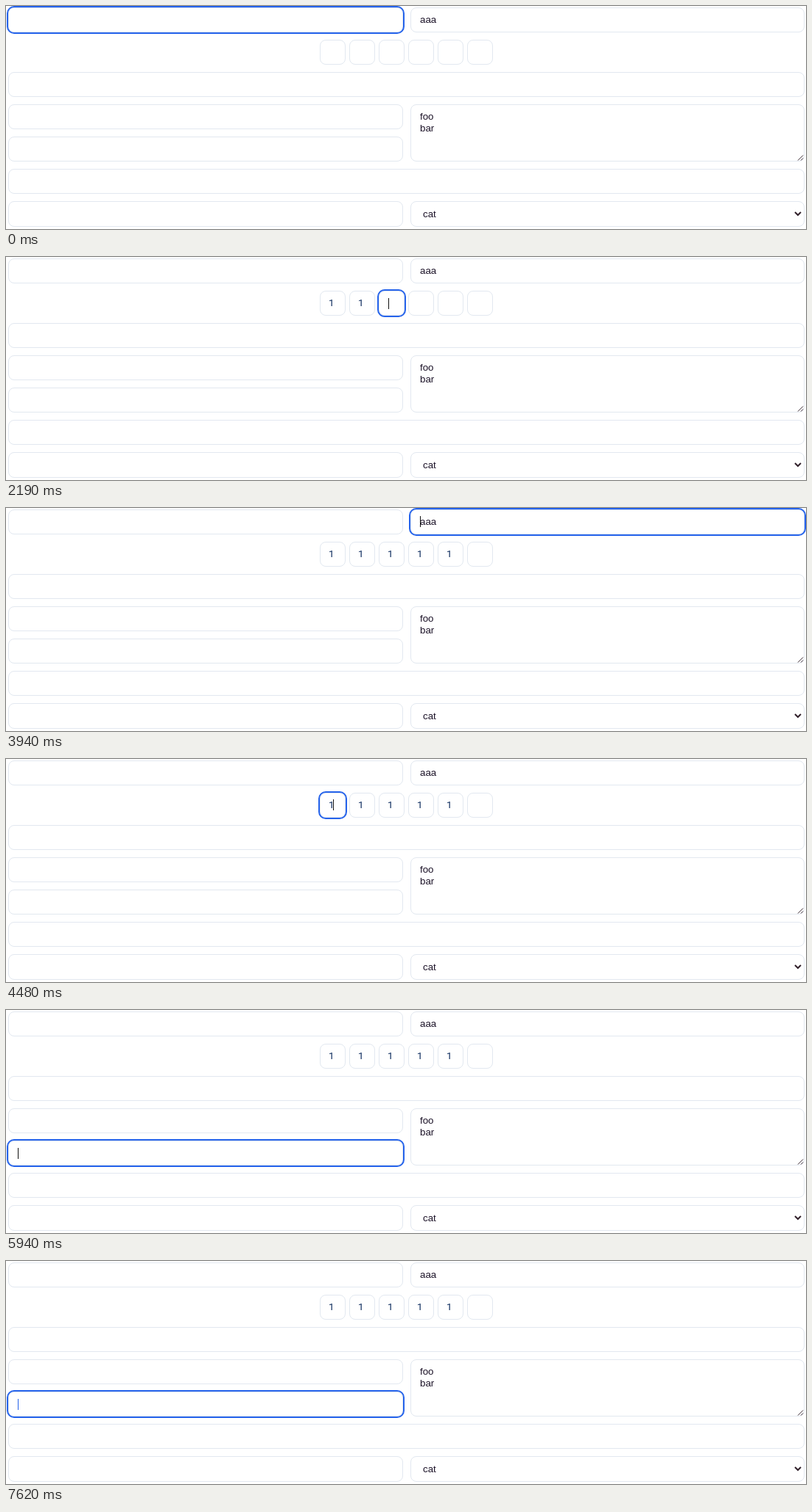
These frames come from a looping animation (1086 px wide and 304 px high, 8000 ms). An HTML page:

```html
<!DOCTYPE html>
<html lang="en">
<head>
<meta charset="utf-8">
<title>Form navigation</title>
<style>
  html, body { margin: 0; width: 100%; height: 100%; overflow: hidden; background: #fff; }
  svg { display: block; }
  .field { fill: #fff; stroke: #e2e8f0; }
  #ring { fill: none; stroke: #2563eb; stroke-width: 2; }
  text { font: 13.333px Arial, "Liberation Sans", sans-serif; fill: #1c1328; }
  .digit { font-family: Roboto, sans-serif; fill: #0b2a5c; }
  .mark { fill: none; stroke: #33222c; }
</style>
</head>
<body>
<svg width="1086" height="304" viewBox="0 0 1086 304">
  <g id="fields"></g>
  <text x="562" y="23">aaa</text>
  <text x="562" y="155">foo</text>
  <text x="562" y="171">bar</text>
  <text x="566" y="288">cat</text>
  <path class="mark" d="M1075 210.5l7-7M1079 210.5l3-3"/>
  <path class="mark" stroke-width="2" d="M1071 281l4 4 4-4"/>
  <g id="digits"></g>
  <rect id="ring" height="36" rx="9"/>
  <rect id="caret" width="1" height="15"/>
</svg>
<script>
const LOOP = 8000, BLUE = '#2563eb';
const $ = id => document.getElementById(id);

function add(parent, tag, attrs) {
  const el = document.createElementNS('http://www.w3.org/2000/svg', tag);
  for (const key in attrs) el.setAttribute(key, attrs[key]);
  return parent.appendChild(el);
}

// x, y, width, height
const fields = {
  name: [3, 2, 536, 34],
  word: [549, 2, 535, 34],
  wide: [3, 90, 1081, 34],
  upper: [3, 134, 536, 34],
  lower: [3, 178, 536, 34],
  area: [549, 134, 535, 78],
  long: [3, 222, 1081, 34],
  last: [3, 266, 536, 35],
  pick: [549, 266, 535, 35]
};
for (let i = 0; i < 6; i++) fields['pin' + i] = [426 + 40 * i, 46, 35, 34];

for (const [x, y, w, h] of Object.values(fields))
  add($('fields'), 'rect', { class: 'field', x: x + .5, y: y + .5, width: w - 1, height: h - 1, rx: 7.5 });

const typedAt = [1990, 2190, 2460, 2650, 2920];
const digits = typedAt.map((_, i) => {
  const el = add($('digits'), 'text', { class: 'digit', x: 438 + 40 * i, y: 67 });
  el.textContent = '1';
  return el;
});

// time, focused field, caret offset (x = 0 hides it), caret colour
const steps = [
  [0, 'name', 0],
  [460, 'name'],
  [990, 'name', 0],
  [1460, 'pin0'],
  [1990, 'pin1'],
  [2190, 'pin2'],
  [2460, 'pin3'],
  [2650, 'pin4'],
  [2920, 'pin5'],
  [3120, 'word', 35, 9, BLUE],
  [3520, 'word', 28, 9],
  [3720, 'word', 20, 9],
  [3940, 'word', 13, 9],
  [4170, 'name'],
  [4480, 'pin0', 18, 9],
  [4790, 'pin1', 18, 9],
  [5100, 'pin2', 18, 9],
  [5250, 'wide', 13, 10, BLUE],
  [5630, 'upper'],
  [5940, 'lower'],
  [6250, 'area', 13, 9],
  [6550, 'area', 13, 25],
  [6630, 'area', 20, 25],
  [7010, 'area', 28, 25],
  [7240, 'long'],
  [7620, 'lower', 13, 10, BLUE]
];

function show(el, visible) {
  el.setAttribute('visibility', visible ? 'visible' : 'hidden');
}

function place(el, x, y) {
  el.setAttribute('x', x);
  el.setAttribute('y', y);
}

function draw(now) {
  const t = now % LOOP;
  const [, focus, dx = 13, dy = 10, color = '#111'] = steps.findLast(step => step[0] <= t);
  const [x, y, w] = fields[focus];

  place($('ring'), x - 1, y - 1);
  $('ring').setAttribute('width', w + 2);
  show($('ring'), focus !== 'area');

  place($('caret'), x + dx, y + dy);
  $('caret').setAttribute('fill', color);
  show($('caret'), dx > 0);

  digits.forEach((el, i) => show(el, t >= typedAt[i]));
  requestAnimationFrame(frame);
}

const start = performance.now();
function frame() { draw(performance.now() - start); }
frame();
</script>
</body>
</html>
```
